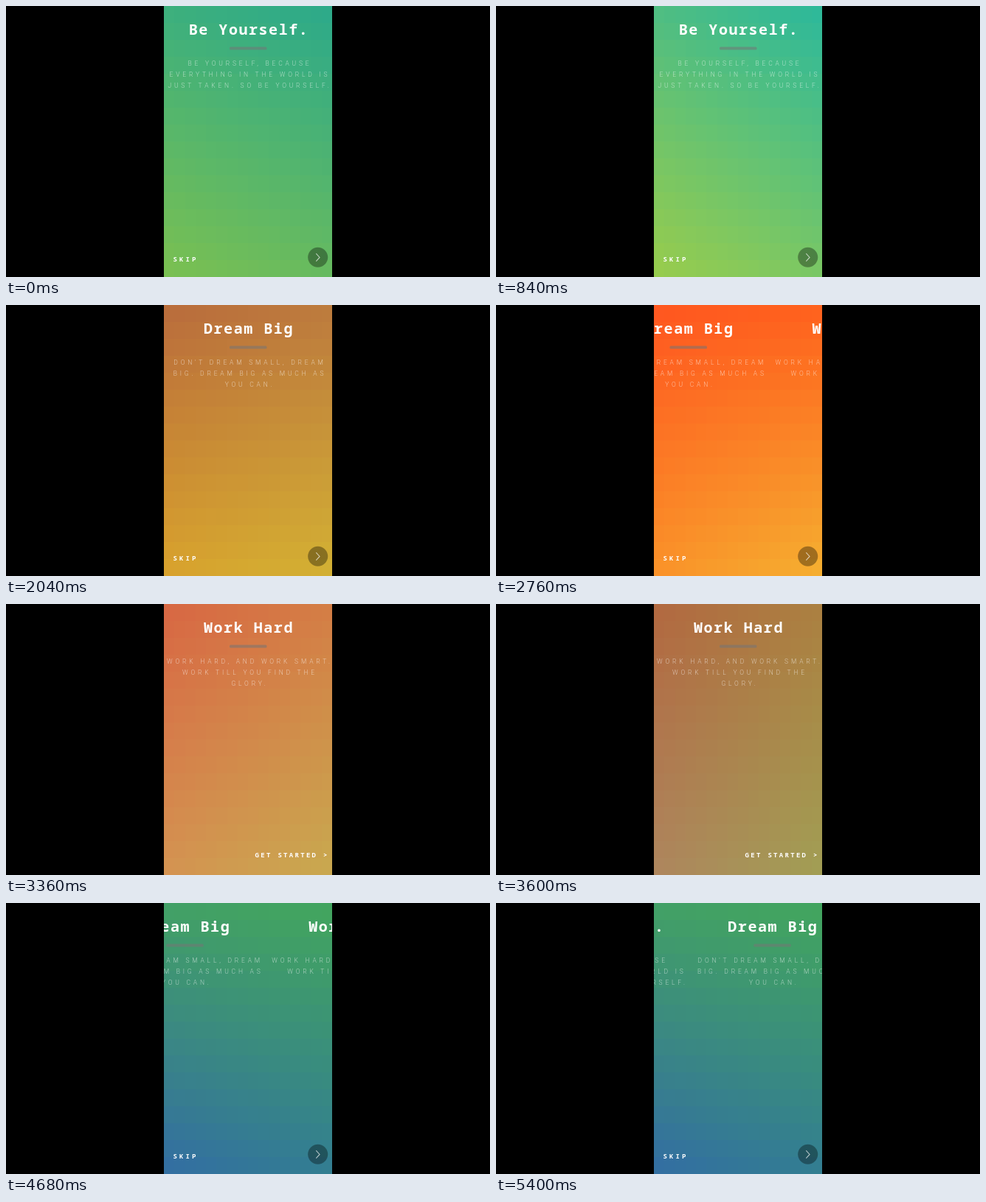
Recreate the animation shown at these times as an HTML page with a canvas. Size 656 by 368 pixels, loop 5.52 s.

```html
<!DOCTYPE html>
<html lang="en">
<head>
<meta charset="utf-8">
<title>Onboarding</title>
<style>
  html, body { margin: 0; width: 100%; height: 100%; overflow: hidden; background: #000; }
  #phone { position: absolute; left: 214px; top: 0; width: 228px; height: 368px; overflow: hidden; }
  canvas, svg { position: absolute; left: 0; top: 0; display: block; }
  text { fill: #fff; }
  .title, .action { font-family: "Noto Sans Mono", monospace; }
  .title { font-size: 20px; font-weight: 600; letter-spacing: 1.55px; text-anchor: middle; }
  .body { font: 300 8.5px Roboto, sans-serif; letter-spacing: 3.8px; fill-opacity: .58; text-anchor: middle; }
  .action { font-size: 9px; font-weight: 700; }
  #skip text { letter-spacing: 3.1px; }
  #start { letter-spacing: 2.3px; }
  .bar { fill: #757575; fill-opacity: .55; }
</style>
</head>
<body>
<div id="phone">
  <canvas id="bg" width="228" height="368"></canvas>
  <svg width="228" height="368" viewBox="0 0 228 368">
    <g id="pages"></g>
    <g id="skip">
      <text class="action" x="12.5" y="347">SKIP</text>
      <circle cx="208.7" cy="341.3" r="13.5" fill="#000" fill-opacity=".35"/>
      <path d="M206.3 336.2l4.8 5.2-4.8 5.2" fill="none" stroke="#fff" stroke-opacity=".65" stroke-width="1.1"/>
    </g>
    <text id="start" class="action" x="123.6" y="344">GET STARTED &gt;</text>
  </svg>
</div>
<script>
const LOOP = 5520, STEP = 120, W = 228, H = 368;

const pages = [
  ["Be Yourself.", "BE YOURSELF, BECAUSE", "EVERYTHING IN THE WORLD IS", "JUST TAKEN. SO BE YOURSELF."],
  ["Dream Big", "DON'T DREAM SMALL, DREAM", "BIG. DREAM BIG AS MUCH AS", "YOU CAN."],
  ["Work Hard", "WORK HARD, AND WORK SMART.", "WORK TILL YOU FIND THE", "GLORY."]
];

// Corner colours: top left, top right, bottom left, bottom right
const lime = "50be82 2db99b 9bcd4b 7dc864";
const orange = "ff5820 ff641e fa962a f5b432";
const blue = "42a067 42a55f 326ca5 327d94";
const skies = [
  [0, "3eb07d 2daa8a 7dc150 69bb5f"],
  [480, lime],
  [1320, lime],
  [2040, "ba6e3c be7d3e daa52d d4b434"],
  [2520, orange],
  [3120, orange],
  [3360, "d86944 d48046 d49652 c8ac50"],
  [3840, "8c6a3e 82843c 887a6c 7a965a"],
  [4320, blue],
  [LOOP, blue]
].map(([t, s]) => [t, s.split(" ").map(h => [0, 2, 4].map(i => parseInt(h.substr(i, 2), 16)))]);

// Swipes: start time, direction
const swipes = [[1320, 1], [2587, 1], [4400, -1], [5261, -1]];
const SWIPE = 480;

const $ = id => document.getElementById(id);
const ctx = $("bg").getContext("2d");
const dots = document.createElement("canvas");
dots.width = dots.height = 2;
const dotCtx = dots.getContext("2d");

function add(parent, tag, attrs, text = "") {
  const el = document.createElementNS("http://www.w3.org/2000/svg", tag);
  for (const k in attrs) el.setAttribute(k, attrs[k]);
  el.textContent = text;
  return parent.appendChild(el);
}

pages.forEach(([title, ...lines], i) => {
  const g = add($("pages"), "g", { transform: `translate(${i * W} 0)` });
  add(g, "text", { class: "title", x: 115, y: 38.5 }, title);
  add(g, "rect", { class: "bar", x: 89, y: 55.5, width: 50.5, height: 4, rx: 1.5 });
  lines.forEach((s, n) => add(g, "text", { class: "body", x: 116.5, y: 81 + 15 * n }, s));
});

const ease = x => { x = Math.min(1, Math.max(0, x)); return x * x * (3 - 2 * x); };
const scrollAt = t => swipes.reduce((p, [start, dir]) => p + dir * ease((t - start) / SWIPE), 0);

// Four pixels, enlarged smoothly so their centres sit on the corners
function paintSky(t) {
  const n = skies.findIndex(([end]) => end > t);
  const [t0, from] = skies[n - 1], [t1, to] = skies[n];
  const k = (t - t0) / (t1 - t0);
  from.forEach((c, i) => {
    dotCtx.fillStyle = `rgb(${c.map((v, j) => Math.round(v + (to[i][j] - v) * k))})`;
    dotCtx.fillRect(i % 2, i >> 1, 1, 1);
  });
  ctx.drawImage(dots, -W / 2, -H / 2, W * 2, H * 2);
}

function draw(now) {
  const t = Math.floor((now % LOOP) / STEP) * STEP;
  const page = scrollAt(t), last = page > 1.5;
  paintSky(t);
  $("pages").setAttribute("transform", `translate(${(-page * W).toFixed(2)} 0)`);
  $("skip").style.display = last ? "none" : "";
  $("start").style.display = last ? "" : "none";
}

const began = performance.now();
function tick() {
  draw(performance.now() - began);
  requestAnimationFrame(tick);
}
tick();
</script>
</body>
</html>
```
